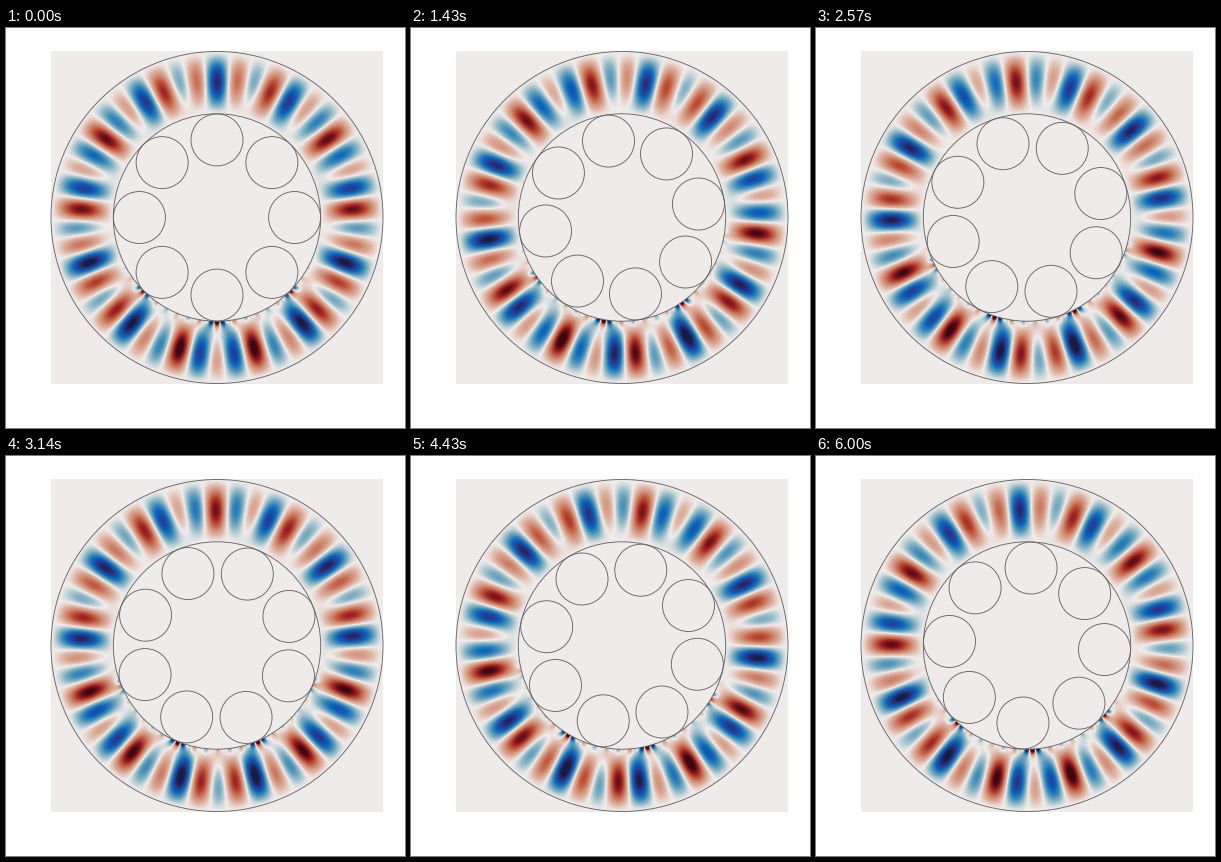
Recreate the animation shown at these times as a matplotlib script. Size 399 px wide and 400 px high, loop 6.14 s.

```python
import numpy as np
import matplotlib.pyplot as plt
from matplotlib.animation import FuncAnimation
from matplotlib.colors import LinearSegmentedColormap
from matplotlib.patches import Circle

W, H, DPI = 399, 400, 100
CX, CY = 211, 189.5
R_OUT, R_IN = 166, 103.7
R_BALL, R_ORBIT = 26, 77.6
BALLS = 8
LEFT, RIGHT, TOP, BOTTOM = 45, 377, 23, 356
TICK, STEPS = 20, 43
LINE = dict(fill=False, edgecolor="#666666", linewidth=0.65)

SHADES = [
    (24, 28, 67), (41, 58, 143), (11, 102, 189), (69, 144, 185),
    (150, 187, 200), (240, 236, 235), (222, 180, 163), (208, 139, 115),
    (192, 88, 59), (153, 30, 36), (60, 9, 17),
]
cmap = LinearSegmentedColormap.from_list(
    "stress", [tuple(c / 255 for c in shade) for shade in SHADES], N=512)

# Polar grid; psi is measured from the bottom, counter-clockwise on screen
x, y = np.meshgrid(np.arange(LEFT, RIGHT) + 0.5 - CX,
                   np.arange(TOP, BOTTOM) + 0.5 - CY)
radius = np.hypot(x, y)
ring = (radius >= R_IN) & (radius <= R_OUT)
r = radius[ring]
psi = np.arctan2(x, y)[ring]
depth = (r - R_IN) / (R_OUT - R_IN)
load = np.clip(np.cos(psi), 0, 1) ** 1.5
gain = 1 + 0.1 * np.cos(psi)


def profile(power):
    """Radial shape of a wave: zero at both rims."""
    return np.sin(np.pi * depth ** power) ** 1.35


SHORT, LONG = 0.62 * profile(1.15), 0.40 * profile(0.85)


def field(phi):
    """Stress in the ring when the contacts have turned by phi."""
    chi = psi - np.pi
    waves = -gain * (SHORT * np.cos(23 * chi + 24 * phi)
                     + LONG * np.cos(10 * chi + 8 * phi))
    # truncated series of point loads, fading away from the inner rim
    z = (R_IN / r * np.exp(1j * (psi + phi))) ** BALLS
    d = np.log(r / R_IN)
    contact = sum((1 + 8 * m * d) * (z ** m).real for m in range(4, 11))
    out = np.zeros(radius.shape)
    out[ring] = waves + 0.28 * load * contact
    return out


fields = [field(np.radians(s)) for s in range(STEPS)]

fig = plt.figure(figsize=(W / DPI, H / DPI), dpi=DPI, facecolor="white")
ax = fig.add_axes([0, 0, 1, 1])
ax.set_xlim(0, W)
ax.set_ylim(H, 0)
ax.axis("off")

image = ax.imshow(fields[0], cmap=cmap, vmin=-1, vmax=1, aspect="auto",
                  extent=(LEFT, RIGHT, BOTTOM, TOP), interpolation="nearest")
for rim in (R_OUT, R_IN):
    ax.add_patch(Circle((CX, CY), rim, **LINE))
balls = [ax.add_patch(Circle((CX, CY), R_BALL, **LINE)) for _ in range(BALLS)]


def draw(k):
    step = int((k + 1) * TICK * 7 / 1000)
    image.set_data(fields[step])
    for i, ball in enumerate(balls):
        a = np.radians(step + i * 360 / BALLS)
        ball.center = CX + R_ORBIT * np.cos(a), CY - R_ORBIT * np.sin(a)
    return [image, *balls]


anim = FuncAnimation(fig, draw, frames=307, interval=TICK,
                     repeat=True, repeat_delay=0)
plt.show()
```
